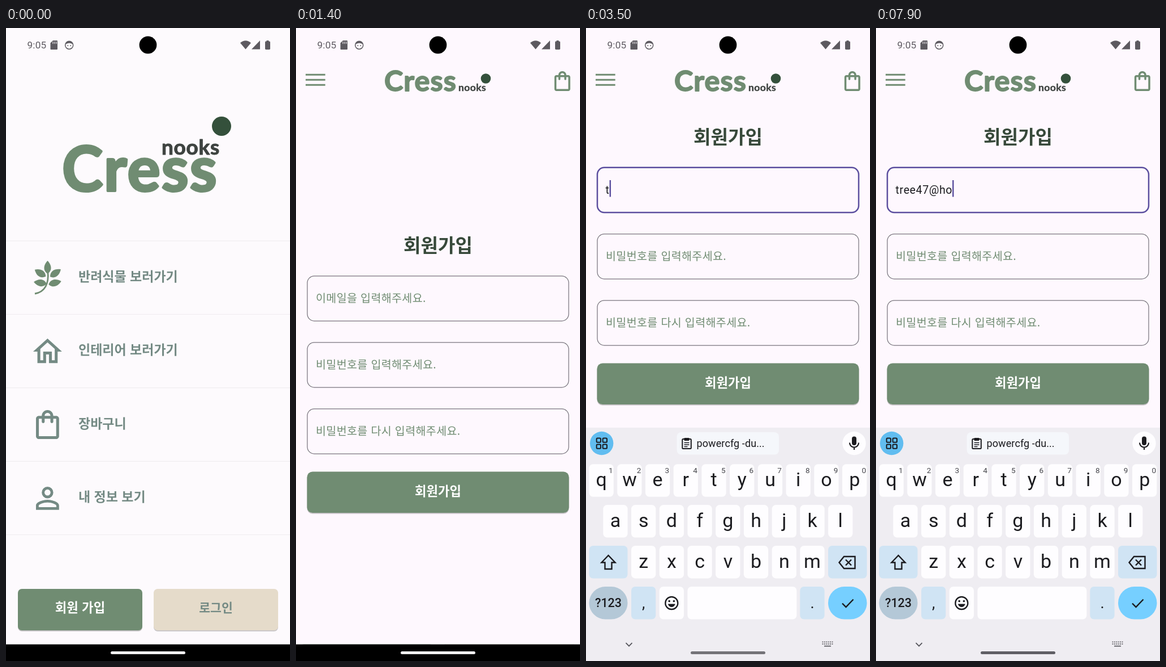
An HTML page for the animation above (8000 ms loop, 502 by 1115 pixels).

```html
<!DOCTYPE html>
<html lang="ko">
<head>
<meta charset="utf-8">
<title>회원가입</title>
<style>
html, body { margin: 0; width: 100%; height: 100%; overflow: hidden; background: #000; }
svg { display: block; width: 100vw; height: 100vh; }
text { white-space: pre; }
.ko { font-family: "Noto Sans CJK KR", "Noto Sans CJK", "Noto Sans KR", sans-serif; }
.ro { font-family: Roboto, sans-serif; }
.logo { font-family: Lato, sans-serif; font-weight: 700; stroke-linejoin: round; }
</style>
</head>
<body>
<svg id="stage" viewBox="0 0 502 1115" xmlns="http://www.w3.org/2000/svg"></svg>
<script>
const LOOP = 8000, STEP = 100;
const GREEN = '#708c72', MUTED = '#748a84', DARK = '#37493a', INK = '#1b1b1f';
const PAGE_H = 1085.7, SHIFT = 191, KEY_H = 411;

const ICON = {
  home: 'M12 5.69l5 4.5V18h-2v-6H9v6H7v-7.81l5-4.5M12 3L2 12h3v8h6v-6h2v6h6v-8h3L12 3z',
  bag: 'M18 6h-2c0-2.21-1.79-4-4-4S8 3.79 8 6H6c-1.1 0-2 .9-2 2v12c0 1.1.9 2 2 2h12c1.1 0 2-.9 2-2V8c0-1.1-.9-2-2-2zm-6-2c1.1 0 2 .9 2 2h-4c0-1.1.9-2 2-2zm6 16H6V8h2v2c0 .55.45 1 1 1s1-.45 1-1V8h4v2c0 .55.45 1 1 1s1-.45 1-1V8h2v12z',
  person: 'M12 5.9a2.1 2.1 0 1 1 0 4.2a2.1 2.1 0 1 1 0-4.2m0 9c2.97 0 6.1 1.46 6.1 2.1v1.1H5.9V17c0-.64 3.13-2.1 6.1-2.1M12 4a4 4 0 1 0 0 8a4 4 0 1 0 0-8zm0 9c-2.67 0-8 1.34-8 4v3h16v-3c0-2.66-5.33-4-8-4z'
};

// Drawing helpers
const rect = (x, y, w, h, r, fill, more = '') =>
  `<rect x="${x}" y="${y}" width="${w}" height="${h}" rx="${r}" fill="${fill}" ${more}/>`;
const circle = (x, y, r, fill, more = '') =>
  `<circle cx="${x}" cy="${y}" r="${r}" fill="${fill}" ${more}/>`;
const line = (d, color, w) =>
  `<path d="${d}" fill="none" stroke="${color}" stroke-width="${w}"/>`;
const icon = (name, x, y, s, fill) =>
  `<path d="${ICON[name]}" transform="translate(${x} ${y}) scale(${s})" fill="${fill}" fill-rule="evenodd"/>`;
// Hangul text, placed by the middle of its glyphs
const ko = (s, x, cy, size, fill, weight = 700, anchor = 'start', more = '') =>
  `<text class="ko" x="${x}" y="${cy + size * .38}" font-size="${size}" font-weight="${weight}" fill="${fill}" text-anchor="${anchor}" ${more}>${s}</text>`;
const ro = (s, x, y, size, fill, more = '') =>
  `<text class="ro" x="${x}" y="${y}" font-size="${size}" fill="${fill}" ${more}>${s}</text>`;
const word = (s, x, y, size, fill, edge) =>
  `<text class="logo" x="${x}" y="${y}" font-size="${size}" fill="${fill}" stroke="${fill}" stroke-width="${edge}" letter-spacing="${size * .02}">${s}</text>`;
const button = (x, y, w, h, r, fill) =>
  rect(x, y + 1.8, w, h, r, '#000', 'opacity=".22"') + rect(x, y, w, h, r, fill);

function homePage() {
  const s = 2.55, x = 42.8;
  const leaf = (cx, cy, a) =>
    `<path d="M0 11C-9 5-7-5 0-12C7-5 9 5 0 11Z" transform="translate(${cx} ${cy}) rotate(${a})" fill="${GREEN}"/>`;
  const labels = ['반려식물 보러가기', '인테리어 보러가기', '장바구니', '내 정보 보기'];
  let out = rect(-30, -30, 562, 1146, 0, '#fdfafd');
  out += word('Cress', 99, 287, 109, GREEN, 4) + word('nooks', 275, 223, 37, '#3e4340', 1);
  out += circle(381, 173, 17, '#34503b');
  for (let i = 0; i < 5; i++) out += rect(-30, 374.4 + 129.4 * i, 562, 1.2, 0, '#f1edf1');
  out += leaf(73.5, 422, 0) + leaf(61, 432, -58) + leaf(87, 432, 55) + leaf(61, 449, -82) + leaf(86, 449, 76);
  out += line('M74 430C76 450 69 465 51 468', GREEN, 2.8);
  out += icon('home', x, 539.3, s, MUTED) + icon('bag', x, 667.9, s, MUTED) + icon('person', x, 797.8, s, MUTED);
  labels.forEach((t, i) => out += ko(t, 128, 437 + 129.4 * i, 23, MUTED));
  out += button(21, 988, 220, 73, 7, GREEN) + button(261, 988, 220, 73, 7, '#e5dbca');
  out += ko('회원 가입', 131, 1021, 22.3, '#fff', 700, 'middle');
  out += ko('로그인', 371, 1021, 21.6, MUTED, 700, 'middle');
  return out;
}

function signUpPage() {
  const hints = ['이메일을 입력해주세요.', '비밀번호를 입력해주세요.', '비밀번호를 다시 입력해주세요.'];
  let form = ko('회원가입', 251, 382, 33.2, DARK, 800, 'middle');
  hints.forEach((t, i) => {
    const y = 436.8 + 117 * i;
    form += rect(20, y, 462, 79.2, 12.2, 'none', `id="field${i}" stroke="#79757e" stroke-width="1.25"`);
    form += ko(t, 35, y + 38.3, 19.54, GREEN, 400, 'start', `id="hint${i}" letter-spacing=".35"`);
  });
  form += ro('', 34.6, 483, 19.54, INK, 'id="typed" letter-spacing=".61"');
  form += rect(34.6, 459, 2.44, 29.4, 0, '#5b4f9f', 'id="caret"');
  form += button(19.5, 781.5, 463, 72.5, 9.8, GREEN);
  form += ko('회원가입', 251, 815.5, 22.3, '#fff', 800, 'middle');
  return rect(0, 0, 502, PAGE_H, 0, '#fef8fe') +
    line('M17 82.3H51.700M17 91.300H51.700M17 100.300H51.700', GREEN, 3) + icon('bag', 449.8, 72.5, 1.75, GREEN) +
    word('Cress', 156, 111, 50.5, GREEN, 1.8) + word('nooks', 287, 111, 17.6, '#3e4340', .4) +
    circle(335.5, 89, 8.8, '#34503b') + `<g id="form">${form}</g>`;
}

function statusBar() {
  const c = '#5d5a60';
  return ro('9:05', 37.5, 36, 17.2, c, 'letter-spacing=".2"') +
    `<path d="M83 22h7q1 0 1 1v14q0 1-1 1h-10.500q-1 0-1-1V26.500z" fill="${c}"/>` +
    line('M83 24v4M86 24v4M89 24v4', '#fdf9fd', 1) +
    circle(111.7, 30.2, 7, 'none', `stroke="${c}" stroke-width="1.5"`) +
    `<path d="M105 29a7 7 0 0 1 13.500 0q-3-2.500-6.700-2.500t-6.800 2.500z" fill="${c}"/>` +
    circle(109.3, 31, .9, c) + circle(114.2, 31, .9, c) +
    circle(251, 29.8, 15.4, '#000') +
    `<path d="M414 26.300Q423.500 18 433 26.300L423.500 37.500Z" fill="${c}"/>` +
    `<path d="M434 37.500L449 22V37.500Z" fill="${c}"/>` +
    rect(460.5, 22, 4, 4, 0, c) + rect(458, 23.5, 9, 14.5, 1.4, c);
}

function keyboard() {
  const pitch = 49.72, blue = '#d0e4f4', sky = '#76cfff';
  const key = (x, y, w, fill = '#fefdff', r = 7) => rect(x, y, w, 57.5, r, fill);
  let out = rect(0, 704, 502, KEY_H, 0, '#efedf2');
  ['qwertyuiop', 'asdfghjkl', 'zxcvbnm'].forEach((row, r) => {
    const x0 = [5.5, 30.3, 80][r], y = 768.3 + 71.8 * r;
    [...row].forEach((ch, i) => {
      const x = x0 + pitch * i;
      out += key(x, y, 43.3) + ro(ch, x + 21.7, y + 39, 34, INK, 'text-anchor="middle"');
      if (!r) out += ro((i + 1) % 10, x + 38.3, y + 15.5, 13.5, '#45454b', 'text-anchor="middle"');
    });
  });
  // Shift and backspace
  out += key(5.5, 912, 68, blue) + line('M39.500 929L27.500 941.500H33.500V953H45.500V941.500H51.500Z', INK, 2.4);
  out += key(428, 912, 68.500, blue) + line('M456 931H475.500V952H456L447.500 941.500Z', INK, 2.4) +
    line('M459 936.500L469 946.500M469 936.500L459 946.500', INK, 2.4);
  // Bottom row
  out += key(5.5, 984, 68, '#b4c8d7', 28.7) + ro('?123', 39.5, 1020, 21.5, INK, 'text-anchor="middle" font-weight="500"');
  out += key(80, 984, 43.3, blue) + ro(',', 101.7, 1022, 27, INK, 'text-anchor="middle"');
  out += key(129.7, 984, 43.3) + circle(151.3, 1013, 11, 'none', `stroke="${INK}" stroke-width="2.4"`) +
    circle(147.2, 1009.6, 1.8, INK) + circle(155.4, 1009.6, 1.8, INK) +
    `<path d="M144.800 1014.500h13q-2 5.500-6.500 5.500t-6.500-5.500z" fill="${INK}"/>`;
  out += key(179.4, 984, 193) + key(378.3, 984, 43.3, blue) + ro('.', 400, 1022, 27, INK, 'text-anchor="middle"');
  out += key(428, 984, 68.5, sky, 28.7) + line('M453 1013.500L459.500 1020L472.500 1006.500', INK, 2.4);
  // Toolbar
  out += circle(27.7, 731.5, 20.7, sky, 'id="apps"');
  for (const x of [18.7, 29.7]) for (const y of [722.5, 733.5])
    out += rect(x, y, 7.3, 7.3, 1.5, 'none', `stroke="${INK}" stroke-width="2"`);
  out += rect(160.5, 712, 180.5, 39.5, 8, '#f5f7fb') +
    rect(170.3, 724, 15.5, 17, 1.5, 'none', `stroke="${INK}" stroke-width="2"`) +
    rect(173.5, 722, 9, 5, 1, INK) + line('M173.500 730.500H182.500M173.500 734H182.500M173.500 737.500H179.500', INK, 1.6) +
    ro('powercfg -du...', 195.5, 738, 18, INK, 'letter-spacing=".1"');
  out += circle(474, 731.5, 20.7, '#fefdff') + rect(470, 719.5, 8, 15.5, 4, INK) +
    line('M466 730.500a8 8 0 0 0 16 0M474 738.500V743', INK, 2.2);
  // Navigation strip
  out += line('M70.500 1083.200L76 1088.700L81.500 1083.200', '#55555b', 1.8);
  for (let r = 0; r < 2; r++) for (let i = 0; i < 6; i++)
    out += rect(417.5 + 3.4 * i, 1080.5 + 3.6 * r, 1.9, 1.9, 0, '#66666c');
  out += rect(421, 1087.8, 12, 1.9, 0, '#66666c');
  return out + rect(185, 1098, 132, 5, 2.5, '#1c1c22', 'id="pill"');
}

const stage = document.getElementById('stage');
stage.innerHTML =
  `<g id="home">${homePage()}</g>` +
  rect(0, 0, 502, PAGE_H, 0, '#000', 'id="scrim"') +
  `<g id="signup">${signUpPage()}</g>` +
  rect(0, PAGE_H, 502, 30, 0, '#000') + rect(185, 1098, 132, 5, 2.5, '#f1f0f1') +
  `<g id="keys">${keyboard()}</g>` + statusBar();

const el = {};
stage.querySelectorAll('[id]').forEach(n => el[n.id] = n);
const set = (id, name, v) => el[id].setAttribute(name, v);
const span = (t, a, b) => Math.min(1, Math.max(0, (t - a) / (b - a)));
const mix = (a, b, p) => a + (b - a) * p;

function bezier(x1, y1, x2, y2) {
  const at = (a, b, s) => 3 * (1 - s) * (1 - s) * s * a + 3 * (1 - s) * s * s * b + s * s * s;
  return x => {
    let lo = 0, hi = 1;
    for (let i = 0; i < 24; i++) {
      const m = (lo + hi) / 2;
      if (at(x1, x2, m) < x) lo = m; else hi = m;
    }
    return at(y1, y2, (lo + hi) / 2);
  };
}
const zoomIn = bezier(.05, 0, .133, .06), zoomOut = bezier(.208, .82, .25, 1);
const glide = bezier(.4, 0, .2, 1);
const zoom = x => x < 1 / 6 ? .4 * zoomIn(x * 6) : .4 + .6 * zoomOut((x - 1 / 6) * 1.2);
const scaleAt = k => `translate(251 543) scale(${k}) translate(-251 -543)`;

const FOCUS = 2400;
const TYPING = [[FOCUS, ''], [3400, 't'], [3800, 'tr'], [4100, 'tre'], [4400, 'tree'], [5500, 'tree4'],
  [5900, 'tree47'], [6300, 'tree47@'], [7000, 'tree47@h'], [7200, 'tree47@ho'],
  [7500, 'tree47@hou'], [7900, 'tree47@ho']];

function draw(t) {
  // Page change
  const x = span(t, 1100, 1400), p = zoom(x);
  set('home', 'transform', scaleAt(mix(1, 1.05, p)));
  set('scrim', 'opacity', .6 * span(x, .2075, .4175) * (x < 1 ? 1 : 0));
  set('signup', 'transform', scaleAt(mix(.85, 1, p)));
  set('signup', 'opacity', span(x, .125, .25));

  // Focus and keyboard
  const on = t >= FOCUS - 100;
  set('field0', 'stroke', on ? '#5b4f9f' : '#79757e');
  set('field0', 'stroke-width', on ? 2.5 : 1.25);
  set('form', 'transform', `translate(0 ${-SHIFT * glide(span(t, 2595, 2889))})`);
  set('keys', 'transform', `translate(0 ${KEY_H * (1 - glide(span(t, 2560, 2800)))})`);
  set('keys', 'visibility', t > 2560 ? 'visible' : 'hidden');
  set('pill', 'opacity', .06 + .52 * span(t, 2800, 3500) + .1 * span(t, 3500, 4100));
  const tint = span(t, 2900, 3300);
  set('apps', 'fill', `rgb(${mix(118, 97, tint)},${mix(207, 189, tint)},${mix(255, 240, tint)})`);

  // Typing, with a caret that blinks from the last key
  const [since, str] = TYPING.filter(k => k[0] <= t).pop() || [0, ''];
  el.typed.textContent = str;
  set('hint0', 'visibility', str ? 'hidden' : 'inherit');
  set('caret', 'x', 34.6 + (str ? el.typed.getComputedTextLength() : 0));
  set('caret', 'visibility', on && Math.floor(Math.max(0, t - since) / 500) % 2 === 0 ? 'inherit' : 'hidden');
}

const start = performance.now();
function tick() {
  const t = (performance.now() - start) % LOOP;
  draw(Math.floor(t / STEP) * STEP);
  requestAnimationFrame(tick);
}
draw(0);
requestAnimationFrame(tick);
</script>
</body>
</html>
```
